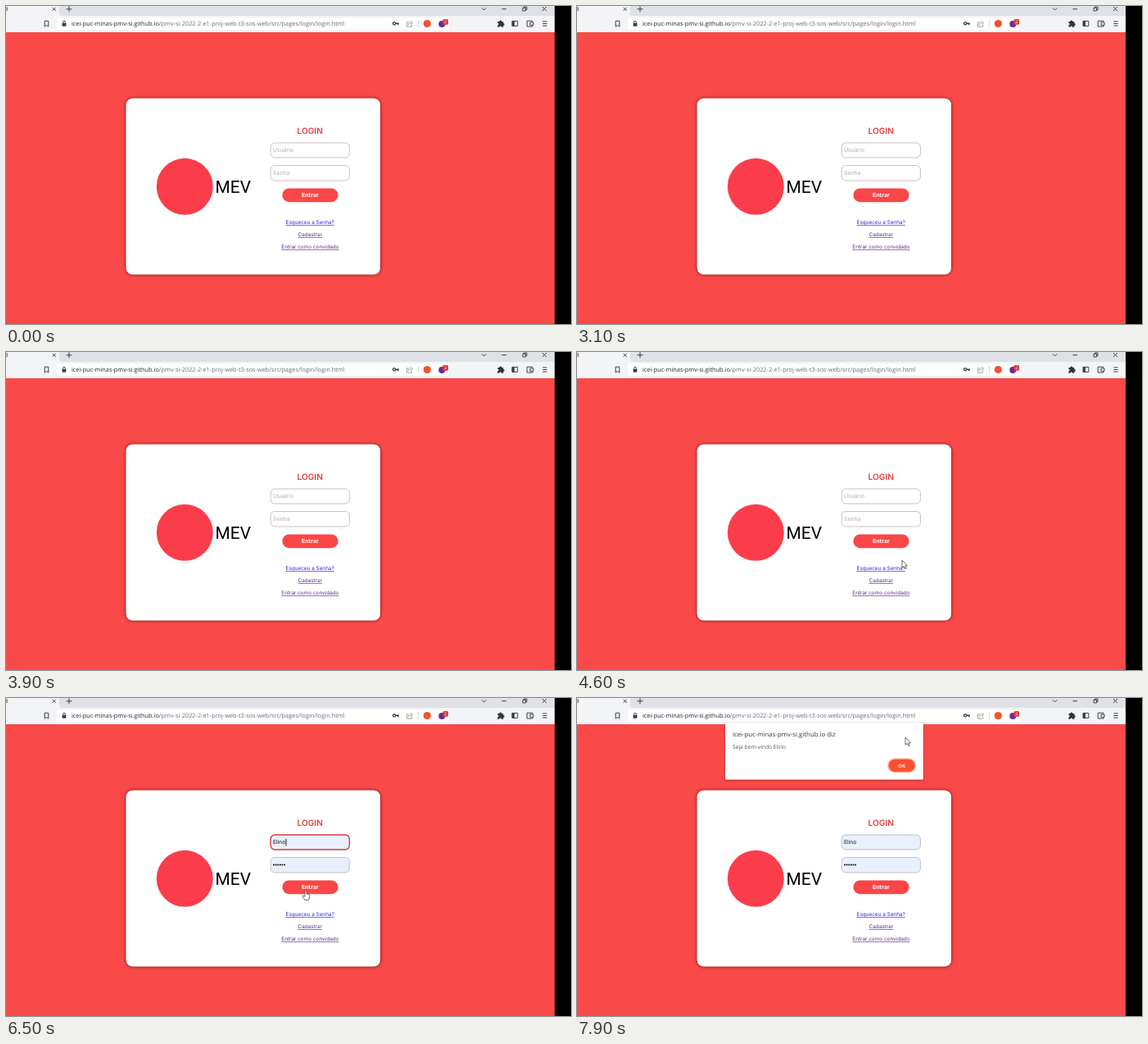
Write an HTML page that moves like this. It is 690 by 388 pixels and loops after 8000 ms.

```html
<!DOCTYPE html>
<html lang="pt-BR">
<head>
<meta charset="utf-8">
<title>Login</title>
<style>
  html, body { margin: 0; width: 100%; height: 100%; overflow: hidden; background: #000; }
  svg { display: block; width: 100%; height: 100%; }
  text { text-rendering: geometricPrecision; }
  .ui { font-family: "Open Sans", "Noto Sans", sans-serif; }
  .page { font-family: Inter, Roboto, sans-serif; }
  .mid { text-anchor: middle; }
  .line { fill: none; stroke: #3c4043; stroke-width: 1; }
  .field { stroke: #bdb2ae; stroke-width: .8; }
  .link { font-size: 6.4px; text-decoration: underline; fill: #5b2a86; }
  .hint { font-size: 6.85px; fill: #b9aaa2; }
  .value { font-size: 6.7px; fill: #111; }
  .pointer { fill: #fff; stroke: #444; stroke-width: .8; stroke-linejoin: round; }
</style>
</head>
<body>
<svg viewBox="0 0 690 388" preserveAspectRatio="none">
  <defs>
    <filter id="cardShadow" x="-5%" y="-5%" width="110%" height="110%">
      <feDropShadow dx="0" dy="0" stdDeviation="2.2" flood-color="#300" flood-opacity=".75"/>
    </filter>
    <filter id="dialogShadow" x="-5%" y="-10%" width="110%" height="125%">
      <feDropShadow dx="0" dy="1" stdDeviation="1.3" flood-color="#300" flood-opacity=".5"/>
    </filter>
    <clipPath id="corner"><rect width="203" height="42"/></clipPath>
    <g id="lock">
      <rect x="-2.4" y="-.8" width="4.8" height="4" rx=".5" fill="#3c4043"/>
      <path class="line" d="M-1.4-.6v-1.2a1.4 1.4 0 0 1 2.8 0v1.2"/>
    </g>
    <g id="key" class="line">
      <circle cx="-1.9" r="1.6" stroke-width="1.3"/>
      <path d="M-.3 0h4.2M2.8 0v2" stroke-width="1.4"/>
    </g>
    <path id="share" class="line" stroke-width=".8" d="M-1-2.2h-2.4v5.4h6V1M-1.8 1.4Q-1.4-1.6 1.6-1.6M1-3.8 3.7-1.5 1 .6" style="stroke:#888;stroke-width:.8"/>
    <path id="puzzle" fill="#303336" d="M-3.6-2.6h2.1a1.4 1.4 0 0 1 2.8 0h2v2.2a1.4 1.4 0 0 1 0 2.8v1.9h-2.3a1.3 1.3 0 0 0-2.6 0h-2V1.8a1.3 1.3 0 0 0 0-2.6z"/>
    <g id="chrome">
      <rect width="670" height="32" fill="#f3f4f6"/>
      <path d="M65 0H670V12H69Q65 12 65 8Z" fill="#dee1e6"/>
      <text class="ui" x="-1" y="6" font-size="6.5" fill="#333">8</text>
      <path class="line" d="M56.7 1.8l4 4m0-4l-4 4M73.5 3.8h7M77 .3v7"/>
      <path class="line" d="M581 2.4l2.6 2.6 2.6-2.6M605.5 3.7h5.5M631 2.3h3.6v3.6H631zM632.4 2.2V1h3.6v3.6h-1.2M655 1l5 5m0-5l-5 5"/>
      <rect x="62" y="14.5" width="479" height="14.5" rx="2" fill="#fff"/>
      <path class="line" d="M47.2 18.2h4.6v7l-2.3-1.9-2.3 1.9z"/>
      <use href="#lock" x="71" y="21.5"/>
      <text class="ui" x="80" y="24.2" font-size="7.36" fill="#6b6f73"><tspan fill="#24272a">icei-puc-minas-pmv-si.github.io</tspan>/pmv-si-2022-2-e1-proj-web-t3-sos-web/src/pages/login/login.html</text>
      <use href="#key" x="476" y="21.3"/>
      <use href="#share" x="493" y="22"/>
      <path d="M503.5 17v9" stroke="#ccc" stroke-width=".8"/>
      <circle cx="514.3" cy="21.5" r="4.6" fill="#f4512c"/>
      <circle cx="532.3" cy="22" r="4" fill="#662d91"/>
      <rect x="533.3" y="16" width="6.8" height="6.8" rx="1.5" fill="#e53935"/>
      <text class="ui mid" x="536.7" y="21.4" font-size="5" fill="#fff">2</text>
      <use href="#puzzle" x="604" y="21.5"/>
      <path class="line" d="M618 18.4h6.8v6H618z"/>
      <path d="M618 18.4h3v6h-3z" fill="#3c4043"/>
      <path class="line" d="M643 19.2v-1h-6.8v6.8h6.8v-1M640 20h4v3.3h-4z"/>
      <path class="line" d="M655.4 18.9h5.2m-5.2 2.6h5.2m-5.2 2.6h5.2"/>
    </g>
  </defs>

  <rect width="670" height="388" fill="#fa4949"/>
  <use href="#chrome"/>

  <g class="page">
    <rect x="146.7" y="112.7" width="310.3" height="214.8" rx="8" fill="#fff" filter="url(#cardShadow)"/>
    <circle cx="218.3" cy="220.3" r="34.5" fill="#fb3d4b"/>
    <text x="255.5" y="228.3" font-size="21" style="font-family:Roboto,sans-serif">MEV</text>
    <text class="mid" x="371.2" y="155.8" font-size="10.2" font-weight="600" fill="#e0403f">LOGIN</text>
    <rect id="user" class="field" x="323.2" y="167" width="96.2" height="18" rx="5" fill="#fff"/>
    <rect id="pass" class="field" x="323.2" y="194.5" width="96.2" height="18.5" rx="5" fill="#fff"/>
    <g id="hints" class="hint">
      <text x="326" y="178.4">Usuário</text>
      <text x="326" y="206">Senha</text>
    </g>
    <g id="values">
      <text class="value" x="326" y="178.3">Elino</text>
      <path d="M327 203.6h14" stroke="#111" stroke-width="2" stroke-linecap="round" stroke-dasharray="0 2.62"/>
    </g>
    <path id="caret" d="M0 171.8v8.6" stroke="#111" stroke-width=".9"/>
    <rect x="337.4" y="222.4" width="68.2" height="16.8" rx="8.4" fill="#fa4646"/>
    <text class="mid" x="371.4" y="233.3" font-size="7" font-weight="700" fill="#fff">Entrar</text>
    <text class="link mid" x="371.2" y="266.3" style="fill:#2a1fe0">Esqueceu a Senha?</text>
    <text class="link mid" x="371.3" y="281.3">Cadastrar</text>
    <text class="link mid" x="371.4" y="296.3">Entrar como convidado</text>
  </g>

  <g id="dialog" class="ui">
    <rect x="181" y="30" width="241.8" height="69.6" rx="1.5" fill="#fff" filter="url(#dialogShadow)"/>
    <text x="190" y="47" font-size="7.8" fill="#33363a">icei-puc-minas-pmv-si.github.io diz</text>
    <text x="190" y="62.4" font-size="6.7" fill="#505357">Seja bem-vindo Elino</text>
    <rect x="379.8" y="74" width="33.6" height="16.8" rx="8.4" fill="#f9512f" stroke="#fbc0b2" stroke-width="1.4"/>
    <text class="mid" x="396.5" y="84.7" font-size="6.2" font-weight="600" fill="#fff">OK</text>
  </g>

  <g id="cursor" class="pointer">
    <path id="arrow" d="M0 0V9.2L2.2 7.4 3.7 10.6 5.2 9.9 3.8 6.8H6.4Z"/>
    <path id="hand" d="M-1 .9Q-1-.2 0-.2T1 .9V4L4.2 4.8Q5.2 5.1 5 6.3L4.4 9.2 3.4 11.6H-.8L-3.6 7.8Q-4.3 6.5-3 6L-1 7.3Z"/>
    <path id="beam" d="M-1.5-4.5h3M0-4.5v9M-1.5 4.5h3"/>
  </g>

  <g id="reload">
    <rect width="670" height="388" fill="#fdfdfd"/>
    <g clip-path="url(#corner)">
      <use href="#chrome"/>
      <rect y="32" width="203" height="10" fill="#f84841"/>
      <rect x="9" y="19" width="70" height="15" rx="2" fill="#fff"/>
      <use href="#lock" x="18.5" y="26.5"/>
      <use href="#key" x="37.5" y="26.3"/>
      <use href="#share" x="54.5" y="26.8"/>
      <circle cx="75" cy="26.5" r="4.4" fill="#f4512c"/>
      <use href="#puzzle" x="90" y="26.5"/>
    </g>
  </g>
  <rect x="670" width="20" height="388"/>
</svg>
<script>
const LOOP = 8000;
const $ = id => document.getElementById(id);

// time, x, y, shape: each position is held until the next
const moves = [
  [4200, 424, 170, "arrow"], [4300, 416, 190, "arrow"], [4400, 404, 215, "arrow"],
  [4500, 393, 238, "arrow"], [4600, 397, 254, "arrow"],
  [4800, 398, 284, "arrow"], [4900, 389, 252, "arrow"], [5000, 382, 213, "arrow"], [5100, 380, 177, "beam"],
  [5400, 380, 183, "arrow"], [5500, 379, 188, "arrow"], [5600, 379, 203, "arrow"], [5700, 379, 212, "arrow"],
  [5900, 377, 220, "arrow"], [6000, 374, 232, "hand"], [6100, 372, 246, "arrow"], [6200, 371, 255, "arrow"],
  [6300, 370, 250, "arrow"], [6400, 368, 241, "arrow"], [6500, 366, 235, "hand"], [6700, 365.5, 231.5, "hand"],
  [7600, 371, 212, "arrow"], [7700, 383, 158, "arrow"], [7800, 396, 90, "arrow"], [7900, 401, 48, "arrow"]
];
// time, opacity, vertical offset
const dialogSteps = [[7000, .3, -9], [7100, .7, -4.5], [7200, 1, 0]];

const held = (steps, t) => steps.findLast(step => step[0] <= t);
const within = (t, from, to) => t >= from && t < to;
const show = (id, on) => $(id).setAttribute("visibility", on ? "visible" : "hidden");
const set = (id, attrs) => Object.entries(attrs).forEach(([k, v]) => $(id).setAttribute(k, v));

function draw(t) {
  const filled = t >= 5700;
  const focused = within(t, 5100, 6800);
  const fill = filled ? "#e8f0fe" : "#fff";
  show("reload", within(t, 3800, 3900));
  show("hints", !filled);
  show("values", filled);
  set("user", { fill, style: focused ? "stroke:#d93a3a;stroke-width:1.4" : "" });
  set("pass", { fill });
  show("caret", focused && !within(t, 6000, 6500));
  set("caret", { transform: `translate(${filled ? 342 : 325.8} 0)` });

  const move = held(moves, t);
  for (const shape of ["arrow", "hand", "beam"]) show(shape, move && move[3] === shape);
  if (move) set("cursor", { transform: `translate(${move[1]} ${move[2]})` });

  const [, opacity, dy] = held(dialogSteps, t) || [0, 0, 0];
  set("dialog", { opacity, transform: `translate(0 ${dy})` });
}

const start = performance.now();
function tick() {
  draw((performance.now() - start) % LOOP);
  requestAnimationFrame(tick);
}
tick();
</script>
</body>
</html>
```
